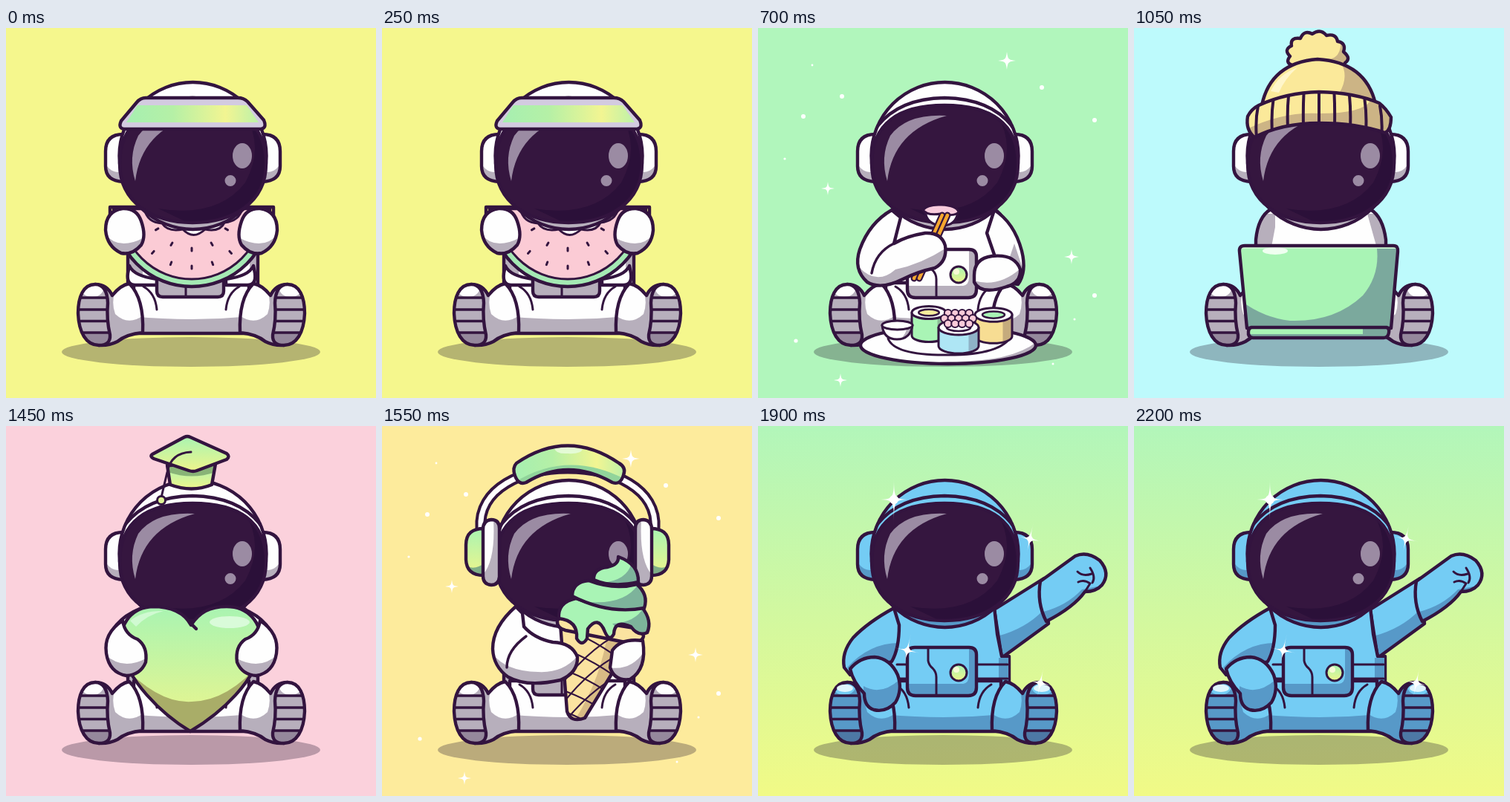
Write an HTML page that moves like this. It is 498 px wide and 498 px high and loops after 2250 ms.

```html
<!DOCTYPE html>
<html lang="en">
<head>
<meta charset="utf-8">
<title>Astronaut moods</title>
<style>
html, body { margin: 0; width: 100%; height: 100%; overflow: hidden; }
svg { display: block; width: 100vw; height: 100vh; }
path { stroke: #33143f; stroke-width: 4; stroke-linejoin: round; stroke-linecap: round; }
.scene { display: none; --suit: #fefefe; --shade: #b7afbc; }
.blue { --suit: #74ccf4; --shade: #5799c8; }
</style>
</head>
<body>
<svg id="stage" viewBox="0 0 498 498">
  <defs>
    <linearGradient id="sky" x2="0" y2="1"><stop stop-color="#b2f6ba"/><stop offset="1" stop-color="#f1fa86"/></linearGradient>
    <linearGradient id="lime" x2="0" y2="1"><stop stop-color="#a9f4b2"/><stop offset="1" stop-color="#eef58b"/></linearGradient>
    <linearGradient id="band"><stop stop-color="#a6efb1"/><stop offset=".35" stop-color="#b5f0a6"/><stop offset=".75" stop-color="#f2f592"/><stop offset="1" stop-color="#bdf1a9"/></linearGradient>
  </defs>
</svg>
<script>
const SUIT = 'var(--suit)', SHADE = 'var(--shade)', INK = '#33143f';
const GREEN = '#a9f4b5', LIME = 'url(#lime)';
let clips = 0;

const path = (d, style) => `<path d="${d}" style="${style}"/>`;
const fill = (d, color = SHADE) => path(d, `fill:${color};stroke:none`);
const line = (d, w = 4.4, color = INK) => path(d, `fill:none;stroke:${color};stroke-width:${w}`);
const oval = (x, y, rx, ry = rx) =>
  `M${x - rx} ${y}a${rx} ${ry} 0 1 1 ${2 * rx} 0a${rx} ${ry} 0 1 1 ${-2 * rx} 0z`;
const mirror = (s, axis = 249.5) => `<g transform="matrix(-1 0 0 1 ${2 * axis} 0)">${s}</g>`;
const both = (s, axis) => s + mirror(s, axis);

// Outlined shape with inner shading clipped to it
function part(d, color = SUIT, inner = '', w = 4.4) {
  const id = 'clip' + clips++;
  return `<clipPath id="${id}"><path d="${d}"/></clipPath>` + fill(d, color) +
    `<g clip-path="url(#${id})">${inner}</g>` + line(d, w);
}

function star(x, y, rx, ry = rx, waist = .13) {
  const a = rx * waist, b = ry * waist;
  const side = (cx, cy, ex, ey) => `C${x + cx} ${y + cy} ${x + cx} ${y + cy} ${x + ex} ${y + ey}`;
  return fill(`M${x} ${y - ry}` + side(a, -b, rx, 0) + side(a, b, 0, ry) +
    side(-a, b, -rx, 0) + side(-a, -b, 0, -ry) + 'z', '#fff');
}

const stars = [[335, 44, 12], [94, 216, 9], [422, 308, 10], [111, 474, 9]].map(s => star(...s)).join('') +
  [[73, 50, 1.4], [113, 92, 3], [61, 119, 3], [382, 80, 3], [453, 124, 3], [36, 176, 1.6],
   [453, 360, 3], [51, 421, 2.6], [426, 392, 1.5], [397, 452, 1.5]].map(s => fill(oval(...s), '#fff')).join('');

const backdrop = color => fill('M0 0H498V498H0z', color) +
  `<g opacity=".3">${fill(oval(249, 436, 174, 20), '#231a30')}</g>`;

const leg = () =>
  part('M120 345Q136 345 143 360Q154 346 166 344Q186 364 184 410Q162 412 150 422Q138 428 125 427z', SHADE,
    fill('M146 357Q156 344 168 342Q188 362 188 384Q166 403 147 385Q142 371 146 357z', SUIT)) +
  part('M120 345C104 345 97 362 97 384C98 410 108 427 125 427Q141 427 140 413Q135 392 137 370Q136 345 120 345z', SHADE,
    fill(oval(116, 351, 15, 11), SUIT) + `<g opacity=".25">${fill('M95 411H142V430H95z', INK)}</g>` +
    line('M98 363H138M96 379H138M96 394.5H139M98 410H140', 3.5));

const seat = () => part('M172 343H327V411H172z', SUIT, fill('M170 388Q250 396 330 388V412H170z')) +
  both(line('M185 348Q201 357 203 379', 3));
const torso = () => part('M184 244Q167 254 164 285V347H339V285Q335 254 318 244z', SUIT,
  fill('M164 250H190V268L184 300V348H160zM314 250H342V348H328V300z'));
const base = () => torso() + seat() + both(leg());

const buckle = () => part('M203 335H293V354Q293 362 285 362H211Q203 362 203 354z', SHADE, line('M242 335V362', 3));

const pack = () => part('M211 298H284Q294 298 294 308V352Q294 363 283 363H212Q201 363 201 352V308Q201 298 211 298z', SUIT,
  fill('M200 347H276Q284 346 284 335V298H296V365H200z') +
  line('M229 299V316Q230 322 235 326Q240 331 240 338V363', 3)) +
  part(oval(270, 332, 11), LIME, fill(oval(267, 328, 4), '#f7fbd5'), 3);

const ears = () => both(
  part('M158 143Q134 143 134 166V186Q134 206 158 207z', SHADE, fill(oval(150, 166, 20, 28), SUIT)), 251.5);

const head = () => ears() +
  part(oval(251.5, 172, 99), SUIT,
    fill('M283 70Q325 95 340 135H355V70zM150 195Q251 325 352 195V280H150z')) +
  line('M161 132Q190 95 251 94Q312 95 342 132') +
  part('M153 183C153 128 190 104 251 104C313 104 350 128 350 183C350 235 305 262 251 262C198 262 153 235 153 183z', '#35163f',
    fill('M322 118Q348 160 322 208Q285 256 205 243L251 265L352 240V118z', '#2b1039')) +
  fill('M254 118Q200 115 178 145Q164 174 174 206Q182 138 254 118z', '#9b8ba3') +
  fill(oval(318, 172, 13, 17), '#9b8ba3') + fill(oval(302, 205.5, 7.5), '#9b8ba3');

function watermelon() {
  let seeds = '';
  for (const [r, n, spread] of [[52, 5, 1.05], [76, 7, 1.1]])
    for (let i = 0; i < n; i++) {
      const a = (i / (n - 1) * 2 - 1) * spread, s = Math.sin(a), c = Math.cos(a);
      seeds += `M${250 + r * s} ${244 + r * c}l${4 * s} ${4 * c}`;
    }
  const ring = r => oval(250, 243, r);
  const hand = part('M157 243Q176 242 182 260Q189 280 182 292Q170 306 155 303Q136 294 134 272Q134 246 157 243z', SUIT,
    fill('M134 278Q152 300 186 282V310H134z'));
  return backdrop('#f5f78d') + line('M140 241H360V262M140 241V262') + base() +
    both(part('M166 320Q172 334 203 338V346H174Q162 346 164 330z')) + buckle() +
    part('M145 243H355A105 105 0 0 1 145 243z', '#a5e9b4',
      fill(ring(95), '#fbcbd5') + line(ring(95), 3) + line(seeds, 3)) +
    part('M186 243Q190 262 210 263Q218 275 238 271Q252 286 268 271Q288 275 294 262Q314 260 318 243z', '#fff', '', 3) +
    head() +
    part('M188 94H312Q320 94 325 99L347 124Q352 136 341 136H161Q150 136 155 125L176 100Q181 94 188 94z', '#d3cbe0',
      fill('M177 104H324L340 127H162z', 'url(#band)')) +
    both(hand);
}

function roll(x, y, rx, h, color, core) {
  const ry = rx * .37;
  return part(`M${x - rx} ${y}v${h}a${rx} ${ry} 0 0 0 ${2 * rx} 0v${-h}z`, color,
      `<g opacity=".25">${fill(`M${x + rx * .5} ${y}h${rx}v${h + 12}h${-rx}z`, INK)}</g>`, 3) +
    part(oval(x, y, rx, ry), '#fff', '', 3) + part(oval(x, y, rx * .6, ry * .5), core, '', 2.5);
}

function sushi() {
  let roe = '';
  for (const [y, n] of [[384, 4], [391, 5], [398, 4]])
    for (let i = 0; i < n; i++) roe += part(oval(270 + (i - (n - 1) / 2) * 9.5, y, 5), '#fbcbd9', '', 2);
  const stick = x => line(`M${x} 252l-38 85`, 9) + line(`M${x} 252l-38 85`, 4.5, '#f6a72f');
  return backdrop('#b1f6bc') + stars + base() + pack() + head() +
    part('M318 245Q345 262 355 300Q362 328 350 345L320 340L318 305L308 276z', SUIT, fill('M345 290L365 350H325z')) +
    part('M291 333Q291 310 315 307Q346 304 353 325Q354 343 335 348Q300 360 291 342z', SUIT,
      fill('M290 340Q325 350 355 322V360H290z')) +
    part('M225 247Q227 264 246 266Q266 267 269 248z', '#fff', '', 3) +
    part('M222 245Q228 237 247 238Q268 239 270 248Q265 254 246 250Q228 253 222 245z', '#f8cbdc', '', 3) +
    stick(248) + stick(255) +
    part('M180 245Q150 262 137 298Q128 325 147 342Q165 353 195 338Q215 328 238 323Q255 314 252 293Q247 275 225 276Q200 280 183 290L192 255z', SUIT,
      fill('M136 322Q160 347 185 325Q220 318 255 295V350H130z')) +
    line('M183 290Q158 302 153 330', 3.5) +
    part(oval(256, 427, 118, 25), SUIT, fill('M135 429Q180 456 256 449Q345 450 378 420V460H135z')) +
    line('M175 418Q184 441 256 440Q328 440 341 414', 3) +
    roll(230, 383, 23, 31, GREEN, '#f6ed9c') + roll(317, 386, 25, 29, '#f7dd93', GREEN) +
    roll(270, 403, 27, 25, '#aee6f5', '#fff') + roe +
    part('M167 400Q169 419 187 419Q205 419 208 400z', SUIT, fill('M190 420Q201 412 200 400H212V420z'), 3) +
    part(oval(187.5, 400, 20.5, 6), '#fff', '', 3);
}

function laptop() {
  let ribs = '';
  for (let i = -4; i <= 4; i++) {
    const x = 249 + i * 20.5, y = 87 + i * i * 1.1;
    ribs += `M${x} ${y}Q${x + i} ${y + 20} ${x + i * .5} ${y + 44}`;
  }
  const shell = 'M149 293H349Q356 293 355 301L346 404H152L142 301Q141 293 149 293z';
  return backdrop('#bdfafc') + base() + head() +
    part('M213 50Q203 47 210 38Q201 29 212 24Q210 12 224 14Q229 2 240 8Q251 0 259 10Q272 7 274 18Q286 20 282 32Q293 41 284 47Q282 54 270 51Q247 38 224 52Q218 55 213 50z', '#fbe99a',
      fill('M262 42Q280 40 278 15L295 30V60H255z', '#ccb485')) +
    part('M172 104Q184 47 247 42Q312 46 325 102z', '#fbe99a',
      fill('M278 46Q290 65 276 88L330 105V45z', '#ccb485') + fill('M184 85Q195 62 220 53Q203 68 195 87z', '#fff6ca')) +
    part('M168 104Q205 87 249 86Q297 87 330 101Q339 108 346 120Q346 137 338 141Q300 128 249 128Q200 128 162 147Q150 137 153 119Q158 109 168 104z', '#fbe99a',
      fill('M150 137Q200 112 250 115Q308 115 318 98L350 105V150H150z', '#ccb485') + line(ribs, 4)) +
    part(shell, '#7ba99d', fill('M138 290H326Q333 330 308 360Q270 396 210 394Q175 390 145 368z', GREEN) +
      fill('M140 290H358V297H140z', '#cffad3') + fill(oval(190, 300, 17, 5), '#effff0')) +
    part('M158 403H340Q344 404 343 410Q342 417 336 417H160Q153 416 154 409Q154 404 158 403z', '#7ba99d',
      fill('M150 400H308V412H150z', GREEN));
}

function heart() {
  const hand = part('M157 262Q160 281 177 287Q191 297 188 318Q181 335 162 336Q139 332 135 306Q131 279 157 262z', SUIT,
    fill('M134 308Q158 330 190 312V340H134z'));
  return backdrop('#fbd1dc') + base() + head() +
    both(part('M180 246Q141 262 135 298L160 315z')) +
    part('M249 268C238 247 215 243 197 243C172 244 152 262 155 298C162 342 210 388 248 411C290 386 338 342 343 298C346 262 324 243 297 243C274 243 260 251 249 268z', LIME,
      fill('M155 320Q205 374 250 371Q300 370 345 315V415H155z', '#a9ad68') +
      fill(oval(301, 264, 27, 8), '#d9fbd9') + fill('M167 262Q185 248 212 249Q190 254 175 270z', '#d0fad2')) +
    line('M249 266L256 273') + both(hand) +
    part('M217 53L221 79Q250 90 277 79L282 51z', LIME, fill('M217 50L282 48V62Q250 73 218 62z', '#89b477')) +
    part('M197 38L240 15Q244 13 248 15L297 37Q302 41 297 45L257 60Q252 62 246 60L199 44Q193 41 197 38z', LIME) +
    line('M249 35Q222 36 217 62L209 96', 3) + part(oval(209, 100, 5.5), '#dff396', '', 3);
}

function iceCream() {
  const cup = part('M139 138Q113 137 113 160V180Q114 202 139 201z', LIME,
      fill('M110 187Q125 196 140 183V207H110z', '#7fae86')) +
    part('M147 126Q158 126 158 138V203Q157 214 147 214Q136 213 136 202V139Q136 127 147 126z', SUIT,
      fill('M150 126Q153 180 136 200V216H160V126z'));
  const tier = (d, shade) => part(d, GREEN, fill(shade, '#7db39b'));
  const arc = 'M133 138C125 30 375 30 367 138';
  let waffle = '';
  for (let i = 0; i < 6; i++) waffle += `M238 ${270 + i * 28}Q285 ${285 + i * 28} 335 ${325 + i * 28}` +
    `M340 ${270 + i * 28}Q285 ${290 + i * 28} 240 ${350 + i * 28}`;
  return backdrop('#fdeb9c') + stars + base() + head() + buckle() +
    line(arc, 15) + line(arc, 7, '#fefefe') + both(cup) +
    part('M181 50Q250 3 319 50Q329 56 325 66Q321 80 310 76Q250 42 194 76Q184 80 179 67Q175 56 181 50z', 'url(#band)',
      fill('M178 76Q250 31 328 72V84H178z', '#91d49b') + fill('M232 30Q250 27 270 31Q268 38 250 37Q234 38 232 30z', '#e4fbd5')) +
    part('M240 266L249 384Q254 400 273 393L337 288z', '#fbe3a0',
      fill('M305 270Q296 340 258 398H290L345 280z', '#d8bb85') + line(waffle, 2.2)) +
    part('M180 243Q149 270 149 300Q150 324 170 338Q195 352 240 342Q264 332 263 311Q256 292 230 291Q205 286 191 270L189 252z', SUIT,
      fill('M148 305Q165 330 210 331Q246 333 266 306V355H148z')) +
    line('M168 325Q168 302 194 283', 3.5) +
    part('M236 262Q235 272 247 275L327 291Q350 293 352 283Q352 276 340 272L252 258Q239 256 236 262z', '#fbe3a0') +
    part('M310 302Q322 285 351 289Q357 327 334 341Q313 344 307 325z', SUIT, fill('M306 325Q336 330 354 302V346H306z')) +
    tier('M238 259Q236 237 261 232Q310 250 350 244Q364 262 357 278Q345 284 335 270Q313 260 312 280Q306 291 300 277Q291 254 277 273L276 286Q269 298 262 286Q264 262 238 259z',
      'M310 266Q342 264 352 244L368 250V285H328z') +
    tier('M256 229Q256 210 278 208Q312 221 343 213Q359 227 353 245Q305 254 256 229z', 'M270 236Q325 243 345 213H362V252H270z') +
    tier('M285 207Q284 192 303 190Q319 187 318 176Q346 186 345 210Q310 218 285 207z', 'M296 211Q330 208 336 184L350 190V220H296z');
}

function wave() {
  return backdrop('url(#sky)') +
    part('M318 247L385 205L391 266L328 312z', SUIT, fill('M322 283Q360 273 384 248L400 270L325 315z')) +
    part('M380 209L427 175Q443 168 460 181Q475 198 463 214Q455 223 440 223Q425 244 388 263Q375 238 380 209z', SUIT,
      fill('M384 250Q415 242 436 220L462 215L470 235L390 270z')) +
    line('M430 196Q437 203 449 199M431 210Q439 206 447 212L440 223M447 191Q455 203 450 211', 3) +
    part('M184 244Q180 254 178 300V347H338V310H328L322 280L318 244z') +
    fill('M324 312H337V345H324z') + line('M187 321H202M294 321H336M187 340H202M294 340H336', 3) +
    part('M183 245Q148 264 128 285Q112 305 116 325L124 335L180 317Q190 300 190 268z', SUIT,
      fill('M120 325Q150 292 190 292V330H125z')) +
    seat() + both(leg()) + pack() +
    part('M124 327Q137 311 157 311Q178 313 188 335Q195 355 185 372Q172 386 156 382Q143 378 143 360Q128 345 124 327z', SUIT,
      fill('M142 350Q166 364 192 340V390H142z')) +
    head() + both(fill(oval(117, 353, 11, 5), '#dff4fc')) +
    star(183, 99, 26, 34, 0) + fill(oval(183, 99, 6), '#fff') +
    [[366, 152], [201, 302], [380, 346]].map(([x, y]) =>
      `<g transform="rotate(12 ${x} ${y})">${star(x, y, 18, 23, 0)}${fill(oval(x, y, 3.5), '#fff')}</g>`).join('');
}

const drawers = [watermelon, sushi, laptop, heart, iceCream, wave];
const starts = [0, 400, 800, 1150, 1500, 1900], LOOP = 2250;
const stage = document.getElementById('stage');
stage.innerHTML += drawers.map(draw => `<g class="scene${draw === wave ? ' blue' : ''}">${draw()}</g>`).join('');
const scenes = [...stage.querySelectorAll('.scene')];

const begin = performance.now();
function tick() {
  const t = (performance.now() - begin) % LOOP;
  const current = starts.filter(s => s <= t).length - 1;
  scenes.forEach((g, i) => g.style.display = i === current ? 'inline' : 'none');
  requestAnimationFrame(tick);
}
tick();
</script>
</body>
</html>
```
